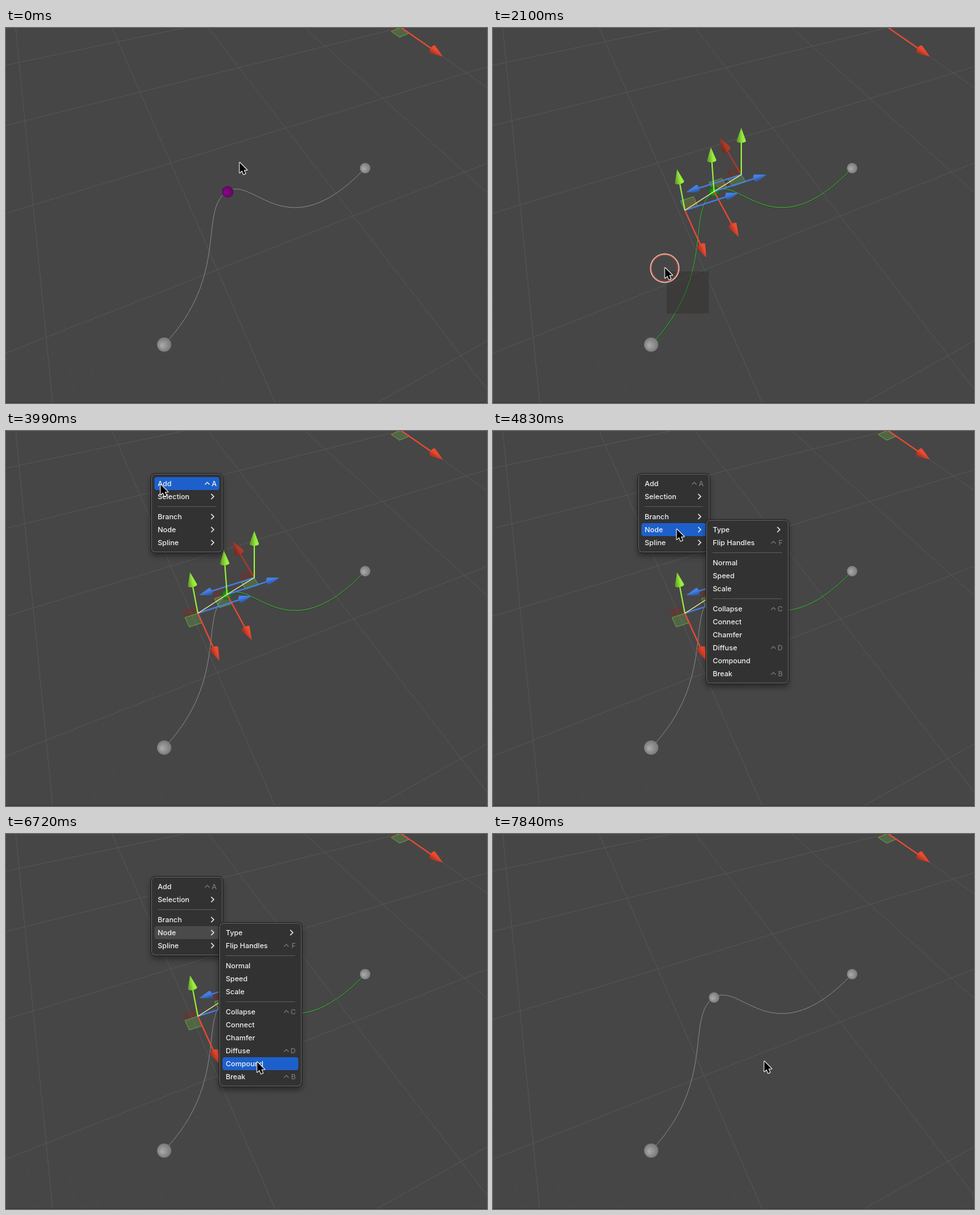
These frames come from a looping animation (742 by 578 pixels, 8 s). An HTML page with a canvas:

```html
<!DOCTYPE html>
<html>
<head>
<meta charset="utf-8">
<style>
html, body { margin: 0; width: 100%; height: 100%; overflow: hidden; background: #464646; }
canvas { display: block; }
</style>
</head>
<body>
<canvas id="stage" width="742" height="578"></canvas>
<script>
const ctx = document.getElementById('stage').getContext('2d');
const W = 742, H = 578, LOOP = 8000, STEP = 70, LAST = 7840;
const HORIZON = -442;

// Moments when the scene switches
const SELECT = 1190, SPLIT = 2240, MENU_OPEN = 3570, SUBMENU_OPEN = 4480, MENU_CLOSE = 6790, DESELECT = 7490;

const add = (p, v, k = 1) => [p[0] + v[0] * k, p[1] + v[1] * k];
const sub = (p, q) => add(p, q, -1);
const within = (t, a, b) => t >= a && t < b;

// ---- scene ----
const start = [244, 488], node = [341, 252], end = [554, 216];
const handleIn = [296, 281], handleOut = [383, 226];
const lower = [start, [346, 381], handleIn, node];
const upper = [node, handleOut, [432, 344], end];

const gizmo = (at, x, y, z, side = 1) => ({ at, x, y, z, side });
const world = gizmo([609, -1], [65, 45], [0, -70], [62, -26]);
const gizmoOut = gizmo(handleOut, [-33, -56], [0, -72], [-85, 27], -1);
const gizmoNode = gizmo(node, [38, 70], [-5, -68], [81, -26]);
const gizmoIn = gizmo(handleIn, [33, 73], [-12, -63], [83, -27]);

// Menu entries: "-" is a rule, ">" opens a submenu, "^X" is a shortcut
function buildMenu(x, y, w, entries) {
  const rows = [], rules = [];
  let cy = y + 15;
  for (const entry of entries) {
    if (entry === '-') {
      rules.push(cy - 4.5);
      cy += 11;
      continue;
    }
    const label = entry.replace(/[>^].*/, '');
    rows.push({ label, mark: entry.slice(label.length), cy });
    cy += 20;
  }
  return { x, y, w, h: cy - 5 - y, rows, rules };
}
const mainMenu = buildMenu(224, 66, 110, ['Add^A', 'Selection>', '-', 'Branch>', 'Node>', 'Spline>']);
const nodeMenu = buildMenu(329, 137, 127, ['Type>', 'Flip Handles^F', '-', 'Normal', 'Speed', 'Scale', '-',
  'Collapse^C', 'Connect', 'Chamfer', 'Diffuse^D', 'Compound', 'Break^B']);

// ---- pointer script ----
const moves = [], presses = [];
const glide = (from, to, x, y) => moves.push({ from, to, goal: [x, y] });
const press = (from, to, kind) => presses.push({ from, to, kind });

glide(0, 420, 292, 285);
glide(420, 840, 397, 319);
press(840, SELECT, 'drag');
glide(840, SELECT, 318, 232);
glide(1330, 1680, 333, 440);
press(1820, SPLIT, 'drag');
glide(1820, 2170, 257, 361);
glide(2450, 2730, 262, 118);
glide(2940, 3220, 241, 72);
press(3150, MENU_OPEN, 'menu');
glide(3920, 3990, 238, 82);
glide(3990, SUBMENU_OPEN, 283, 151);
glide(4830, 5530, 402, 297);
glide(5600, 5810, 397, 306);
glide(5810, 6300, 387, 351);
press(6510, 6650, 'menu');
glide(6720, 7210, 418, 416);
press(7350, DESELECT, 'click');
glide(7420, LAST, 418, 350);

function pointerAt(t) {
  let pos = [360, 207];
  for (const { from, to, goal } of moves) {
    if (t <= from) break;
    const p = Math.min(1, (t - from) / (to - from));
    pos = add(pos, sub(goal, pos), p * p * (3 - 2 * p));
  }
  return pos;
}

// ---- drawing ----
function line(points, color, width = 1) {
  ctx.beginPath();
  points.forEach(p => ctx.lineTo(...p));
  ctx.strokeStyle = color;
  ctx.lineWidth = width;
  ctx.stroke();
}

// Evenly spaced floor lines meeting at a point on the horizon
function fan(vanishX, first, gap, color, from, to) {
  for (let i = from; i < to; i++) {
    const x = first + gap * i;
    line([[x, 0], add([x, 0], [x - vanishX, -HORIZON], 4)], color);
  }
}

function floor() {
  const faint = ctx.createLinearGradient(0, 200, 0, H);
  faint.addColorStop(0, 'rgba(255,255,255,0)');
  faint.addColorStop(1, 'rgba(255,255,255,.014)');
  fan(-28.6, 15, 14.9, faint, -5, 60);
  fan(2390, 274, 33.2, faint, -5, 50);
  fan(-28.6, 15, 148.7, '#555', 0, 5);
  fan(2390, 274, 332, '#555', 0, 5);
}

function branch([a, b, c, d], active) {
  const stroke = (color, width, dy) => {
    ctx.beginPath();
    ctx.moveTo(a[0], a[1] + dy);
    ctx.bezierCurveTo(b[0], b[1] + dy, c[0], c[1] + dy, d[0], d[1] + dy);
    ctx.strokeStyle = color;
    ctx.lineWidth = width;
    ctx.stroke();
  };
  if (active) stroke('rgba(25,70,25,.7)', 2, .6);
  stroke(active ? '#48ae42' : '#858585', 1, 0);
}

function ball([x, y], r, light, dark) {
  const g = ctx.createRadialGradient(x - r * .35, y + r * .15, 0, x, y, r * 1.15);
  g.addColorStop(0, light);
  g.addColorStop(1, dark);
  ctx.fillStyle = g;
  ctx.beginPath();
  ctx.arc(x, y, r, 0, 7);
  ctx.fill();
}

function arrow(at, v, color, size, half) {
  const a = Math.atan2(v[1], v[0]), base = Math.hypot(...v) - size;
  ctx.save();
  ctx.translate(...at);
  ctx.rotate(a);
  line([[0, 0], [base, 0]], color, 2);
  ctx.beginPath();
  ctx.moveTo(base + size, 0);
  ctx.lineTo(base, -half);
  ctx.ellipse(base, 0, 3, half, 0, -Math.PI / 2, Math.PI / 2, true);
  ctx.closePath();
  ctx.fillStyle = color;
  ctx.fill();
  // Shade the side that faces left and down
  const shadow = half * Math.sign(Math.sin(a) + .6 * Math.cos(a));
  const g = ctx.createLinearGradient(0, shadow, 0, -shadow * .3);
  g.addColorStop(0, 'rgba(0,0,0,.4)');
  g.addColorStop(1, 'rgba(0,0,0,0)');
  ctx.fillStyle = g;
  ctx.fill();
  ctx.restore();
}

function plane(at, u, v, rgb, fill, edge) {
  ctx.beginPath();
  [at, add(at, u), add(add(at, u), v), add(at, v)].forEach(p => ctx.lineTo(...p));
  ctx.closePath();
  ctx.fillStyle = `rgba(${rgb},${fill})`;
  ctx.fill();
  ctx.strokeStyle = `rgba(${rgb},${edge})`;
  ctx.lineWidth = 1;
  ctx.stroke();
}

function drawPlanes({ at, x, y, z, side }) {
  const scale = (v, k) => [v[0] * k, v[1] * k];
  const px = scale(x, .2 * side), py = scale(y, .17), pz = scale(z, -.24 * side);
  plane(at, px, py, '50,75,165', .08, .5);
  plane(at, py, pz, '140,40,28', .3, .5);
  plane(at, px, pz, '110,178,72', .3, .8);
}

function drawArrows({ at, x, y, z }) {
  arrow(at, z, '#4480e6', 18, 6);
  arrow(at, x, x[1] < 0 ? '#b23a27' : '#ee4a30', 20, 7.2);
  arrow(at, y, '#98ee3c', 20, 7.2);
}

function drawHandles(held) {
  const shown = [gizmoOut, gizmoNode, gizmoIn];
  shown.forEach(g => drawPlanes(held ? { ...g, side: -1 } : g));
  ball(node, 8, '#1fae1f', '#0f6010');
  shown.forEach(drawArrows);
  line([handleIn, node, handleOut], '#f0efa0', 1.3);
}

function box(x, y, w, h, r, fill) {
  ctx.beginPath();
  ctx.roundRect(x, y, w, h, r);
  ctx.fillStyle = fill;
  ctx.fill();
}

function drawMark(mark, right, cy, color) {
  if (mark === '>') {
    line([[right - 8.5, cy - 4], [right - 4.5, cy], [right - 8.5, cy + 4]], '#e6e6e6', 1.5);
  } else if (mark) {
    line([[right - 18, cy + 1.5], [right - 14.5, cy - 2], [right - 11, cy + 1.5]], color, 1.2);
    ctx.fillStyle = color;
    ctx.textAlign = 'right';
    ctx.fillText(mark[1], right, cy + 4);
  }
}

function drawMenu({ x, y, w, h, rows, rules }, lit, litColor) {
  ctx.save();
  ctx.shadowColor = 'rgba(0,0,0,.4)';
  ctx.shadowBlur = 9;
  ctx.shadowOffsetY = 5;
  box(x - 1, y - 1, w + 2, h + 2, 7, '#1c1c1c');
  ctx.restore();
  box(x, y, w, h, 6, '#646464');
  box(x + 1, y + 1, w - 2, h - 2, 5, '#323232');
  rules.forEach(r => line([[x + 10, r], [x + w - 10, r]], '#595959'));
  ctx.font = '500 11px Inter, sans-serif';
  for (const row of rows) {
    if (row === lit) box(x + 5, row.cy - 10, w - 10, 20, 4, litColor);
    ctx.fillStyle = '#f2f2f2';
    ctx.textAlign = 'left';
    ctx.fillText(row.label, x + 10, row.cy + 4);
    drawMark(row.mark, x + w - 9, row.cy, row === lit ? '#f2f2f2' : '#777');
  }
}

function drawMenus(t, [px, py]) {
  const blue = '#1d60cb';
  const hovered = ({ rows }) => rows.find(r => Math.abs(r.cy - py) <= 10);
  if (t < SUBMENU_OPEN) return drawMenu(mainMenu, hovered(mainMenu), blue);
  const inside = px > nodeMenu.x;
  drawMenu(mainMenu, mainMenu.rows.find(r => r.label === 'Node'), inside ? '#4a4a4a' : blue);
  drawMenu(nodeMenu, inside && hovered(nodeMenu), blue);
}

function drawPress({ from, kind }, pos) {
  if (kind === 'drag') {
    const corner = pointerAt(from);
    ctx.fillStyle = 'rgba(38,36,30,.32)';
    ctx.fillRect(...corner, ...sub(add(pos, [3, 6]), corner));
  }
  const circle = (r, color) => {
    ctx.beginPath();
    ctx.arc(pos[0], pos[1] + 1, r, 0, 7);
    ctx.strokeStyle = color;
    ctx.lineWidth = 1.4;
    ctx.stroke();
  };
  circle(22, '#e8d3ca');
  circle(20.7, '#cf5442');
}

function drawPointer([x, y]) {
  ctx.save();
  ctx.translate(x + .5, y + .5);
  const shape = new Path2D('M0 0V15.5L3.6 12.2 6 18 8.8 16.8 6.4 11.2H11.2Z');
  ctx.lineJoin = 'round';
  ctx.strokeStyle = '#fff';
  ctx.lineWidth = 2;
  ctx.stroke(shape);
  ctx.fillStyle = '#000';
  ctx.fill(shape);
  ctx.restore();
}

function draw(t) {
  const pos = pointerAt(t);
  const pressed = presses.find(p => within(t, p.from, p.to));
  const selected = within(t, SELECT, DESELECT);
  const held = selected && pressed && pressed.kind !== 'menu';

  ctx.fillStyle = '#464646';
  ctx.fillRect(0, 0, W, H);
  floor();
  ctx.fillStyle = '#3b3438';
  ctx.fillRect(0, H - 1, W, 1);

  if (!held) drawPlanes(world);
  drawArrows(world);
  branch(lower, selected && t < SPLIT);
  branch(upper, selected);
  ball(start, 11, '#acacac', '#727272');
  ball(end, 8, '#acacac', '#767676');
  if (selected) drawHandles(held);
  else if (t < SELECT) ball(add(node, [1, .5]), 9, '#980099', '#4c104d');
  else ball(node, 8, '#acacac', '#767676');

  if (within(t, MENU_OPEN, MENU_CLOSE)) drawMenus(t, pos);
  if (pressed) drawPress(pressed, pos);
  drawPointer(pos);
}

function frame(now) {
  draw(Math.min(LAST, Math.floor((now % LOOP) / STEP) * STEP));
  requestAnimationFrame(frame);
}
draw(0);
requestAnimationFrame(frame);
</script>
</body>
</html>
```
